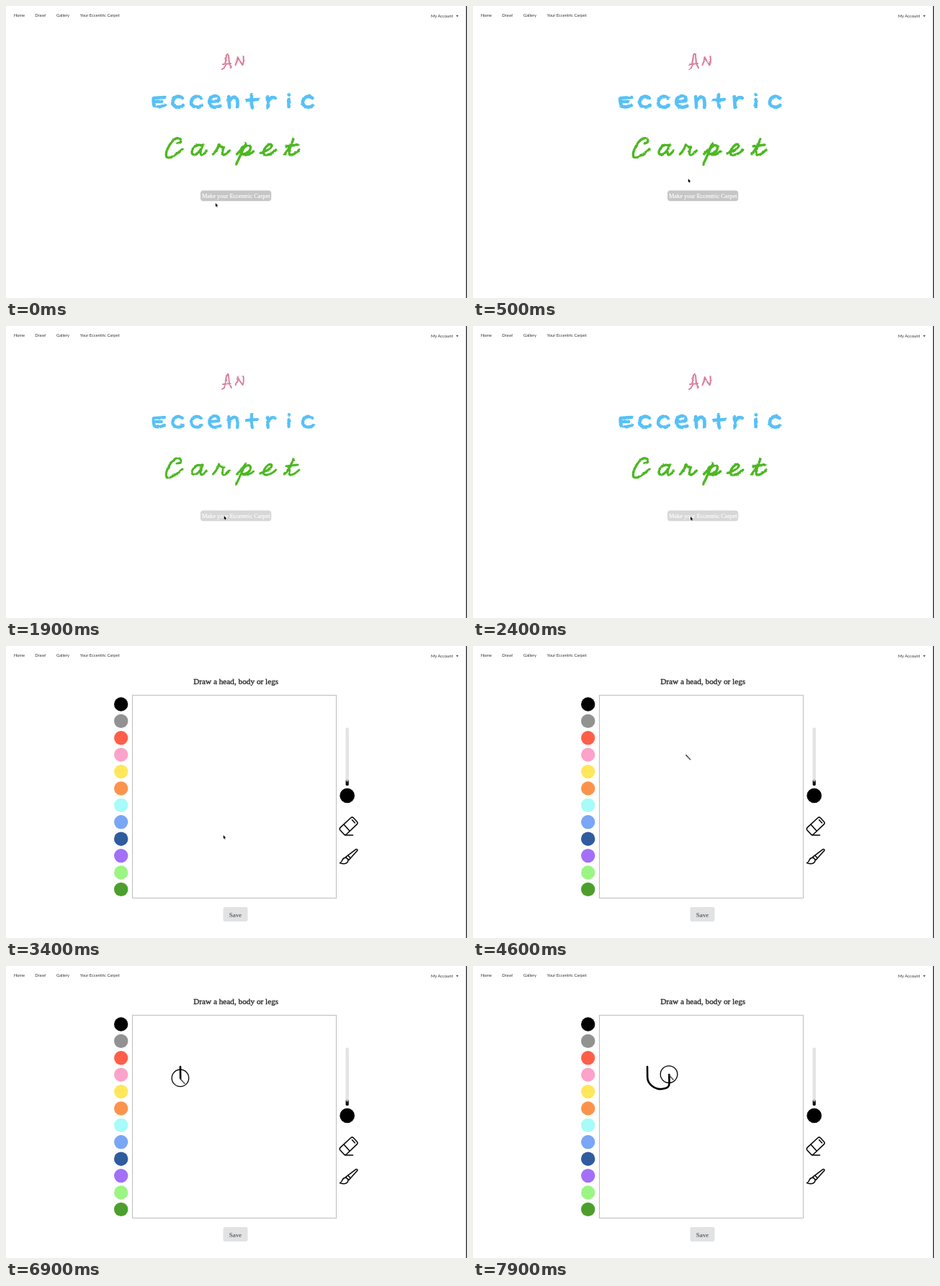
Write an HTML page that moves like this. It is 640 by 406 pixels and loops after 8 s.

```html
<!DOCTYPE html>
<html lang="en">
<head>
<meta charset="utf-8">
<title>Drawing game</title>
<style>
  html, body { margin: 0; width: 100%; height: 100%; overflow: hidden; background: #fff; }
  svg { display: block; width: 640px; height: 406px; }
  .nav { font: 5.8px Lato, sans-serif; fill: #333; }
  .serif { font-family: "Liberation Serif", serif; text-anchor: middle; }
  .line { fill: none; stroke: #000; stroke-linecap: round; stroke-linejoin: round; }
</style>
</head>
<body>
<svg viewBox="0 0 640 406">
  <defs>
    <filter id="rough" filterUnits="userSpaceOnUse" x="180" y="50" width="270" height="190" color-interpolation-filters="sRGB">
      <feTurbulence id="noise" type="fractalNoise" baseFrequency="0.2" numOctaves="2" seed="3"/>
      <feDisplacementMap in="SourceGraphic" scale="2.6" xChannelSelector="R" yChannelSelector="G"/>
    </filter>
  </defs>
  <rect width="640" height="406" fill="#fff"/>

  <g class="nav">
    <text x="10.7" y="15">Home</text>
    <text x="40.2" y="15">Draw!</text>
    <text x="70" y="15">Gallery</text>
    <text x="102.8" y="15">Your Eccentric Carpet</text>
    <text x="590" y="15.7">My Account</text>
    <path d="M624.8 13h3.4l-1.7 2z"/>
  </g>

  <g id="home">
    <g id="title" class="line" filter="url(#rough)"></g>
    <rect id="make" x="270" y="256.5" width="98.3" height="14.7" rx="4"/>
    <text class="serif" x="319.2" y="267" font-size="8.4" fill="#fff" stroke="#fff" stroke-width=".15">Make your Eccentric Carpet</text>
  </g>

  <g id="draw">
    <text class="serif" x="319.2" y="53.3" font-size="11.25" fill="#222" stroke="#222" stroke-width=".3">Draw a head, body or legs</text>
    <g id="paints"></g>
    <rect x="175.5" y="68.5" width="283" height="282" fill="#fff" stroke="#bdbdbd"/>
    <rect x="301.5" y="363" width="34" height="20" rx="2" fill="#e1e2e3"/>
    <text class="serif" x="318.4" y="376.6" font-size="8.7" font-weight="bold" fill="#686868">Save</text>

    <rect x="471.4" y="113.5" width="4.6" height="74" rx="1.5" fill="#e4e4e4"/>
    <rect x="471.6" y="186.2" width="4.2" height="8" rx="1.4" fill="#111"/>
    <rect x="472.2" y="186.5" width="3" height="1.7" rx=".6" fill="#ddd"/>
    <circle cx="473.7" cy="208" r="10.3"/>

    <g class="line" stroke-width="1.5">
      <path d="M464.2 252.4L478.6 239Q480.6 237.2 482.4 239L487.2 244.2Q489 246 487.2 247.9L472.7 261.8Q470.8 263.4 469 261.6L464.1 256.2Q462.4 254.2 464.2 252.4Z"/>
      <path d="M469.1 248.2L477.2 257.3M480.5 241.8L484.5 245.9M470.8 263H481.5"/>
      <path d="M471.4 293.6L485.9 282.7Q488 282 487.9 284.3L476 297.6Z"/>
      <path d="M472.1 294.2Q468.2 294.3 467 297.4Q466.2 300.6 463.4 301.6Q471.5 304.6 474.4 300.1Q475.2 298.4 475 297.2"/>
      <path d="M475 291.5L478 294.8"/>
    </g>

    <path id="ink" class="line" stroke-width="2.6" d="M242 140L242.2 155C242.5 164 252 172 262 171C270 170 272.5 168 272.5 163L272.3 151"/>
    <circle id="ring" r="11.8" class="line" stroke-width="1.3"/>
  </g>

  <path id="arrow" d="M0 0V5L1.1 4L1.9 5.7L2.7 5.4L2 3.7H3.5Z" stroke="#fff" stroke-width=".5" paint-order="stroke"/>
  <path id="beam" class="line" stroke-width=".7" stroke-opacity=".75" d="M-1.3 -3Q0 -3 0 -2.2V2.2Q0 3 -1.3 3M1.3 -3Q0 -3 0 -2.2M0 2.2Q0 3 1.3 3"/>
  <g id="brush" class="line">
    <path d="M.3 .3L6 6.2" stroke-width="1.5" stroke="#333"/>
    <path d="M2.9 2.6L5.7 5.6" stroke-width=".5" stroke="#bbb"/>
  </g>
  <rect x="638.7" width="1.3" height="406" fill="#25252c"/>
</svg>
<script>
const LOOP = 8000, STEP = 100, OPEN = 2800;
const PRESS = 6600, LIFT = 7900;
const $ = id => document.getElementById(id);

function add(parent, tag, attrs) {
  const el = document.createElementNS("http://www.w3.org/2000/svg", tag);
  for (const k in attrs) el.setAttribute(k, attrs[k]);
  return parent.appendChild(el);
}

// Hand-lettered strokes, each drawn around its own centre.
const round = {
  E: "M8 -6L-7 -5Q-8 0 -6 6Q0 9 8 5M-7 0L4 0",
  c: "M7 -5Q1 -10 -5 -4Q-9 4 -2 7Q4 9 8 5",
  e: "M-6 0L6 -1Q7 -8 0 -8Q-8 -6 -7 2Q-4 11 8 6",
  n: "M-6 -7L-5 8M-5 -1Q0 -9 5 -5Q7 0 6 8",
  t: "M0 -10Q-1 2 1 8M-7 -2L8 -3",
  r: "M-4 -7L-3 8M-3 0Q1 -8 7 -5",
  i: "M0 -3L0 7M0 -10l.5 .5"
};
const script = {
  C: "M4 -9Q11 -10 8 -15Q3 -19 -4 -11Q-14 3 -11 10Q-6 14 11 -1",
  a: "M6 -6Q-4 -9 -8 2Q-9 8 -2 6Q4 2 7 -7Q2 5 5 7Q8 7 12 1",
  r: "M-11 6Q-5 0 -3 -7Q0 -3 4 -4Q0 6 4 7Q8 6 12 1",
  p: "M-10 6Q0 -4 2 -9Q-6 10 -11 20M-2 -1Q6 -10 9 -4Q9 5 -3 6Q6 9 13 2",
  e: "M-10 5Q8 -2 6 -7Q2 -10 -4 -1Q-8 8 0 7Q6 6 12 0",
  t: "M-8 6Q0 -4 4 -15Q-4 4 -1 7Q4 8 12 0M-6 -5L10 -7"
};
const thin = {
  A: "M-7 11L-4 9Q-2 0 -1 -8Q0 -13 2 -8L3 3L6 9M-6 4L5 3",
  n: "M-6 5Q-3 0 -3 -6Q0 0 4 5Q6 1 5 -7"
};

const words = [
  { text: "An", set: thin, x: 307, y: 77, gap: 17.5, color: "#d97f9a", width: 2.1 },
  { text: "Eccentric", set: round, x: 212, y: 133, gap: 25.8, color: "#57c1f6", width: 4.7 },
  { text: "Carpet", set: script, x: 234, y: 200, gap: 32.2, color: "#4db722", width: 3.4 }
];
for (const w of words) {
  w.group = add($("title"), "g", { stroke: w.color });
  [...w.text].forEach((ch, i) => add(w.group, "path", {
    d: w.set[ch], transform: `translate(${w.x + i * w.gap} ${w.y})`
  }));
}

["#000", "#929292", "#ff5f49", "#fba3ca", "#ffe75c", "#fb934c",
 "#a7fbf8", "#79a6f6", "#305b9f", "#a370f8", "#9bf583", "#4c9f2c"]
  .forEach((fill, i) => add($("paints"), "circle", { cx: 159.7, cy: 81 + i * 23.4, r: 9.7, fill }));

// Pointer path: time, x, y
const route = [
  [0, 290.9, 274], [200, 291, 273.5], [700, 303, 222], [1100, 302.6, 223], [1400, 302.8, 228],
  [1800, 302.8, 263.4], [2100, 302.6, 265.5], [2400, 302, 265], [2800, 301.8, 263],
  [3400, 301.8, 263], [3700, 300, 185], [4300, 296, 152], [5600, 292.7, 148],
  [6000, 318, 147], [6500, 242, 140], [8000, 242, 140]
];
function pointer(t) {
  const i = route.findIndex(k => k[0] > t);
  const [t0, x0, y0] = route[i - 1], [t1, x1, y1] = route[i];
  const u = (t - t0) / (t1 - t0), e = u * u * (3 - 2 * u);
  return [x0 + (x1 - x0) * e, y0 + (y1 - y0) * e];
}

const show = (id, on) => $(id).setAttribute("display", on ? "inline" : "none");
const ink = $("ink"), inkLength = ink.getTotalLength();
const boil = [{ seed: 3, k: 1 }, { seed: 11, k: .9 }, { seed: 7, k: 1 }];

function render(now) {
  const t = Math.floor(now % LOOP / STEP) * STEP;
  const home = t < OPEN;
  let [x, y] = pointer(t);
  show("home", home);
  show("draw", !home);

  if (home) {
    const b = boil[t / STEP % 3];
    $("noise").setAttribute("seed", b.seed);
    for (const w of words) w.group.setAttribute("stroke-width", w.width * b.k);
    $("make").setAttribute("fill", y > 256 && y < 271 ? "#d7d7d7" : "#c6c6c6");
  }

  const part = Math.min(1, Math.max(0, (t - PRESS) / (LIFT - PRESS)));
  show("ink", part > 0);
  show("ring", t >= PRESS - STEP);
  ink.setAttribute("stroke-dasharray", `${part * inkLength} ${inkLength * 2}`);
  if (t >= PRESS - STEP) {
    const p = ink.getPointAtLength(part * inkLength);
    $("ring").setAttribute("transform", `translate(${p.x - .3} ${p.y - .4})`);
    x = p.x - .3;
    y = p.y + .8;
  }

  const kind = t > 3400 ? "brush" : home && y < 235 ? "beam" : "arrow";
  for (const id of ["arrow", "beam", "brush"]) show(id, id === kind);
  $(kind).setAttribute("transform", `translate(${x} ${y})`);
}

let start;
function tick(now) {
  if (start === undefined) start = now;
  render(now - start);
  requestAnimationFrame(tick);
}
render(0);
requestAnimationFrame(tick);
</script>
</body>
</html>
```
